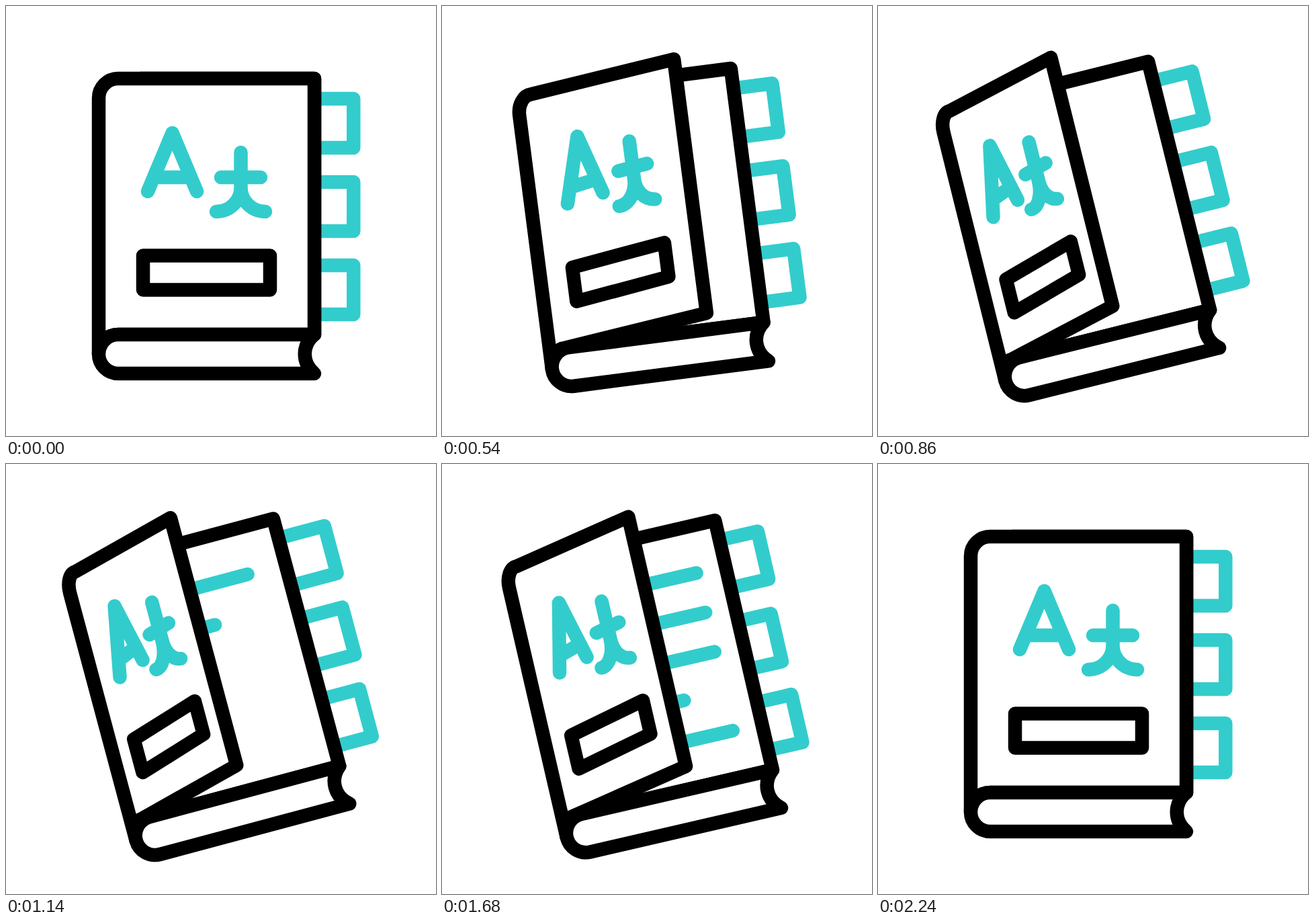
An HTML page that plays this animation: 640 by 640 pixels, repeating every 2400 ms.

```html
<!DOCTYPE html>
<html lang="en">
<head>
<meta charset="utf-8">
<title>Dictionary</title>
<style>
  html, body { margin: 0; width: 100%; height: 100%; overflow: hidden; background: #fff; }
  svg { display: block; width: 100%; height: 100%; }
  path { stroke-width: 20.5; stroke-linecap: round; stroke-linejoin: round; }
  .ink { stroke: #000; fill: #fff; }
  .teal { stroke: #33cccc; fill: none; }
</style>
</head>
<body>
<svg viewBox="0 0 640 640"><g id="book"></g></svg>
<script>
const LOOP = 2400, STEP = 20, OPEN = 200, CLOSED = 2240;
const CENTER = 327.5, TILT = 15, HINGE = 138, SQUEEZE = 0.46;
const book = document.getElementById('book');

const clamp = v => Math.max(0, Math.min(1, v));
const smooth = v => { v = clamp(v); return v * v * (3 - 2 * v); };

// Cubic easing with flat ends; a and b are the horizontal handle positions.
function ease(a, b, x) {
  x = clamp(x);
  let lo = 0, hi = 1;
  for (let i = 0; i < 24; i++) {
    const s = (lo + hi) / 2, r = 1 - s;
    if (3 * r * r * s * a + 3 * r * s * s * b + s * s * s < x) lo = s; else hi = s;
  }
  return smooth((lo + hi) / 2);
}

function addPath(kind, d = '') {
  const el = document.createElementNS('http://www.w3.org/2000/svg', 'path');
  el.setAttribute('class', kind);
  el.setAttribute('d', d);
  book.append(el);
  return el;
}

const tabs = [138, 262, 386].map((y, i) => ({
  el: addPath('teal', `M430,${y} H517.3 v73 H430`), start: 800 + 200 * i
}));

addPath('ink', 'M200,108 H459 V489 H200 Z');

const lines = [414.5, 414.5, 414.5, 354, 414.5].map((end, i) => ({
  el: addPath('teal'), y: 178 + 60.2 * i, end, start: 800 + 100 * i
}));

// Points of the cover are x,y,lift: lift is the rise when fully open.
const cover = [
  ['ink', 'M138,518,0 C138,502,0 151,489,0 167,489,0 L459,489,40.7 L459,108,40.7 ' +
          'L167,108,0 C151,108,0 138,121,0 138,137,0 Z'],
  ['teal', 'M211,276,-1 L247.5,189,16.5 L284,276,15 M220,255,3 L275,255,15.4'],
  ['teal', 'M349.5,218,36.5 L349.5,270,29 C349.5,290,29 333,306,27 313,306,26.5 ' +
           'M349.5,270,29 C349.5,290,29 366,306,34 386,306,32.5 M320,255,28 L379,255,37.5'],
  ['ink', 'M204,371.5,0 L393,371.5,31.5 L393,422.5,31.5 L204,422.5,0 Z']
].map(([kind, shape]) => ({ el: addPath(kind), shape }));

addPath('ink', 'M167,489 H459 C440,505 440,531 459,547 H167 A29,29 0 0 1 167,489 Z');

const fixed = v => v.toFixed(2);

function bend(shape, squeeze, lift) {
  return shape.replace(/(-?[\d.]+),(-?[\d.]+),(-?[\d.]+)/g, (m, x, y, rise) =>
    fixed(HINGE + (x - HINGE) * (1 - SQUEEZE * squeeze)) + ',' + fixed(y - rise * lift));
}

// Out, in past the rest position, and back.
function wobble(s) {
  return 14.5 * (smooth(s / 290) - 2 * smooth((s - 290) / 300) + smooth((s - 590) / 200));
}

function draw(t) {
  const opening = t - OPEN, closing = CLOSED - t;
  const tilt = TILT * ease(0.474, 0.108, Math.min(opening, closing) / 1000);
  const shut = ease(0.525, 0.156, closing / 1000);
  const squeeze = Math.min(ease(0.5, 0.03, opening / 1000), shut);
  const lift = Math.min(ease(0.45, 0.62, opening / 580), shut);

  book.setAttribute('transform', `rotate(${-tilt} ${CENTER} ${CENTER})`);
  for (const { el, shape } of cover) el.setAttribute('d', bend(shape, squeeze, lift));
  for (const { el, start } of tabs)
    el.setAttribute('transform', `translate(${fixed(wobble(t - start))} 0)`);
  for (const { el, y, end, start } of lines) {
    const grown = smooth((t - start) / 400);
    el.setAttribute('d', grown ? `M187,${y} H${fixed(187 + (end - 187) * grown)}` : '');
  }
}

const begin = performance.now();
function tick() {
  const t = (performance.now() - begin) % LOOP;
  draw(Math.floor(t / STEP) * STEP);
  requestAnimationFrame(tick);
}
tick();
</script>
</body>
</html>
```
